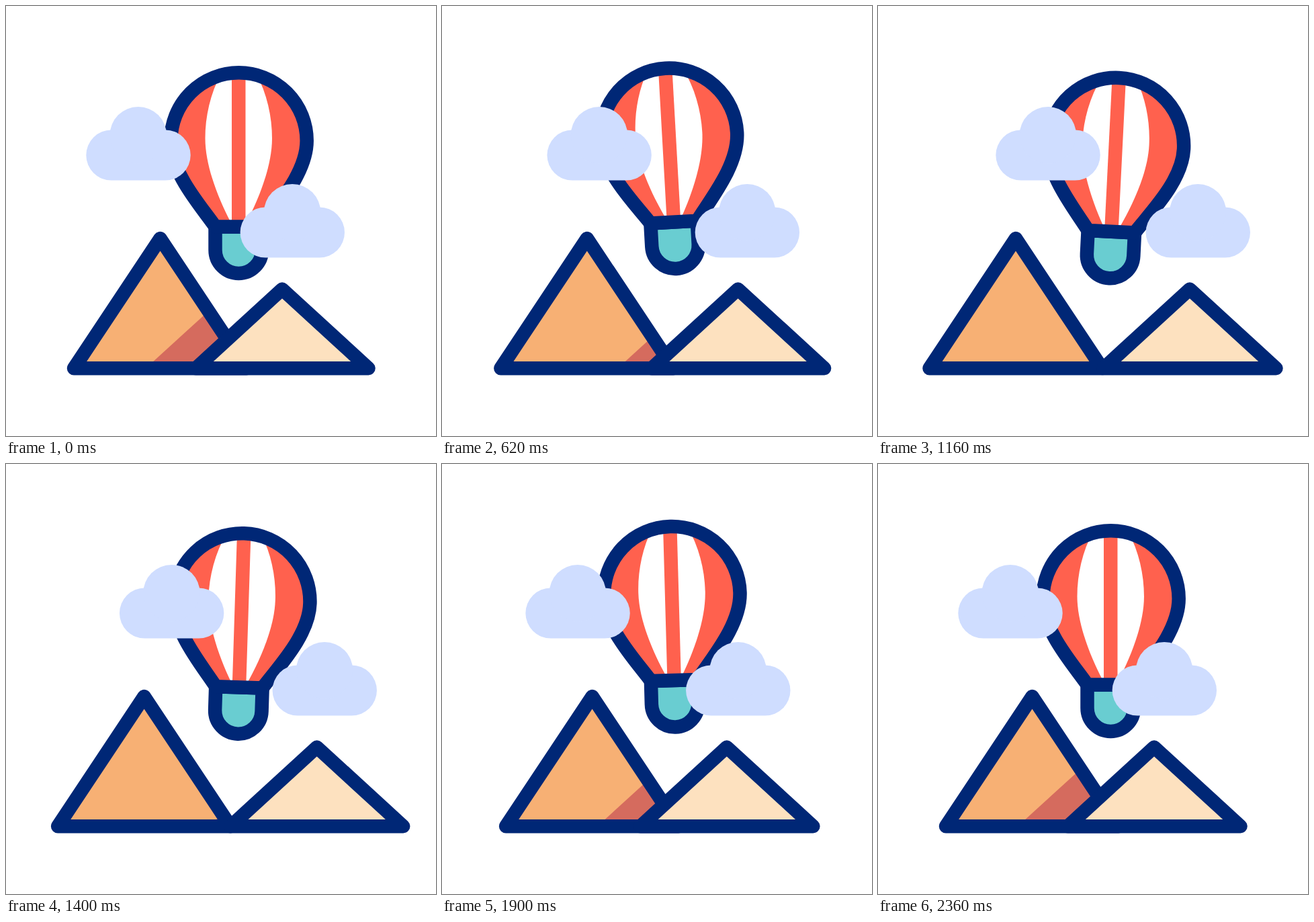
An HTML page for the animation above (2400 ms loop, 640 by 640 pixels).

```html
<!DOCTYPE html>
<html lang="en">
<head>
<meta charset="utf-8">
<title>Balloon over mountains</title>
<style>
  html, body { margin: 0; width: 100%; height: 100%; overflow: hidden; background: #fff; }
  svg { display: block; width: 100%; height: 100%; }

  .line { stroke: #002776; stroke-width: 20.5; stroke-linejoin: round; stroke-linecap: round; }
  .red { fill: #ff614e; }
  .cloud { fill: #cfddff; }

  .slide { animation: slide 2400ms cubic-bezier(.7, 0, .3, 1) infinite; }
  .drift-a { animation: drift-a 2400ms cubic-bezier(.58, 0, .42, 1) infinite; }
  .drift-b { animation: drift-b 2400ms cubic-bezier(.58, 0, .42, 1) infinite; }
  .balloon {
    transform-origin: 346.25px 350px;
    animation: bob 2400ms ease-in-out infinite, sway 2400ms ease-in-out infinite;
  }

  @keyframes slide {
    0%, 99.2%, 100% { translate: 0; }
    50% { translate: var(--dx); }
  }
  @keyframes drift-a {
    0%, 90.8%, 100% { translate: 0; }
    45.4% { translate: 56.3px; }
  }
  @keyframes drift-b {
    0%, 99.6%, 100% { translate: 0; }
    49.2% { translate: 50px; }
  }
  @keyframes bob {
    0%, 99.2%, 100% { translate: 0 0; }
    25% { translate: 0 -7px; }
    50% { translate: 0 7.4px; }
    74.2% { translate: 0 -7px; }
  }
  @keyframes sway {
    0%, 99.2%, 100% { rotate: 0deg; }
    21.7% { rotate: -3.5deg; }
    50% { rotate: 2.9deg; }
    75% { rotate: -1.7deg; }
  }
</style>
</head>
<body>
<svg viewBox="0 0 640 640">
  <defs>
    <path id="peak" d="M101 539.2L229.5 346L358 539.2Z"/>
    <clipPath id="peak-clip"><use href="#peak"/></clipPath>
    <path id="envelope" d="M311.5 328.5C289.5 297 245.3 248.5 245.3 200.5A101.2 101.2 0 0 1 447.7 200.5C447.7 248.5 403 297 381 328.5Z"/>
    <path id="panel" d="M336 100H320.5C304 130 296.5 165 296.5 197C296.5 240 318 290 333.5 320H336Z"/>
    <clipPath id="envelope-clip"><use href="#envelope"/></clipPath>
    <g id="cloud">
      <rect x="119.3" y="184.5" width="155.4" height="75" rx="37.5"/>
      <circle cx="196.8" cy="192.2" r="42.2"/>
    </g>
  </defs>

  <g class="balloon">
    <path class="line" fill="#69cdd1" d="M311.5 328.5V363.2a34.75 34.75 0 0 0 69.5 0V328.5Z"/>
    <use href="#envelope" class="red"/>
    <g fill="#fff" clip-path="url(#envelope-clip)">
      <use href="#panel"/>
      <use href="#panel" transform="translate(692.5) scale(-1 1)"/>
    </g>
    <use href="#envelope" class="line" fill="none"/>
  </g>

  <g class="slide" style="--dx: -24.5px">
    <use href="#peak" fill="#f7b074"/>
    <g clip-path="url(#peak-clip)">
      <path class="slide" style="--dx: 120.5px" fill="#d56b5e" d="M208 539.2L428 338.9V539.2Z"/>
    </g>
    <use href="#peak" class="line" fill="none"/>
  </g>
  <g class="slide" style="--dx: 53px">
    <path class="line" fill="#fde1bf" d="M282.5 539.2L411 421.5L539.5 539.2Z"/>
  </g>

  <g class="cloud drift-a"><use href="#cloud"/></g>
  <g class="cloud drift-b"><use href="#cloud" x="229.3" y="115"/></g>
</svg>
</body>
</html>
```
